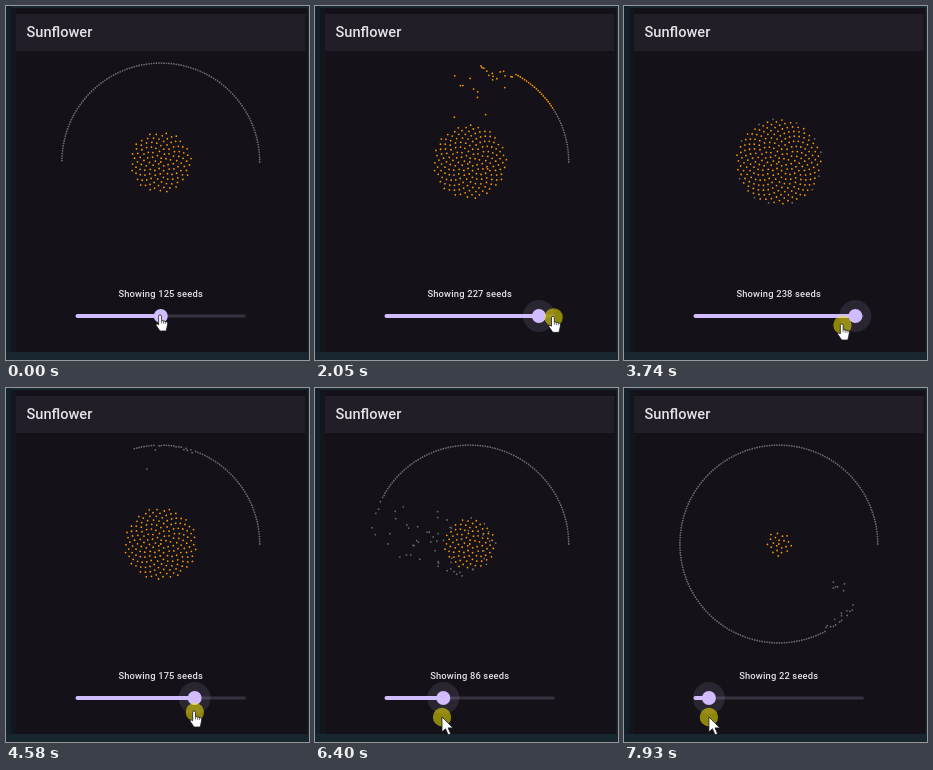
Recreate the animation shown at these times as an HTML page. Size 303 px wide and 354 px high, loop 8 s.

```html
<!DOCTYPE html>
<html lang="en">
<head>
<meta charset="utf-8">
<title>Sunflower</title>
<style>
  html, body { margin: 0; width: 100%; height: 100%; overflow: hidden; background: #18262f; }
  svg { display: block; width: 100%; height: 100%; }
  text { font-family: Roboto, Arial, sans-serif; font-weight: 500; fill: #e6e1e5; }
  .title { font-size: 14.6px; }
  .label { font-size: 9.35px; letter-spacing: .18px; text-anchor: middle; }
  .halo {
    fill: #d0bcff; fill-opacity: .11;
    transform-box: fill-box; transform-origin: center;
  }
  .pointer { fill: #fff; stroke: #1a1a1a; stroke-width: .8; stroke-linejoin: round; }
</style>
</head>
<body>
<svg viewBox="0 0 303 354">
  <rect width="303" height="354" fill="#18262f"/>
  <rect width="5" height="346" fill="#13202a"/>
  <rect x="5" y="2" width="296.5" height="344" fill="#141218"/>
  <rect x="5" y="2" width="5" height="344" fill="#10171d"/>
  <rect x="10" y="8" width="289.5" height="37" fill="#221e28"/>
  <text class="title" x="20.5" y="31">Sunflower</text>
  <g id="seeds"></g>
  <text class="label" id="label" x="154.7" y="290.5"></text>
  <rect x="70" y="308.4" width="170" height="3.2" rx="1.6" fill="#36323f"/>
  <rect id="active" x="69.5" y="308" height="4" rx="2" fill="#d0bcff"/>
  <circle class="halo" id="halo" cy="310" r="16"/>
  <circle id="thumb" cy="310" r="7" fill="#d0bcff"/>
  <g id="cursor">
    <circle id="press" r="9.2" fill="#fff000" fill-opacity=".52"/>
    <g class="pointer" id="hand" transform="translate(-.6 -.5)">
      <path d="M-1.5 .8a1.4 1.4 0 0 1 2.8 0V5l4.6 1q1.8.5 1.6 2.2L6.8 12l-.8 3.5H-.2L-4 9.8q-.5-1.2.8-1.5l1.7 1z"/>
      <path d="M1.3 5v3M3.4 5.6v2.6M5.3 6v2.4" fill="none" stroke-width=".6"/>
    </g>
    <path class="pointer" id="arrow" d="M0 0V15l3.5-3.2 2.6 6 2.6-1.1L6.1 10.9H11z"/>
  </g>
</svg>
<script>
const LOOP = 8000, TICK = 70, PHASE = 20, MAX = 250;
const CX = 154.8, CY = 156, RING = 98.9, SPREAD = RING / 36;
const TRACK = 70, UNIT = .678;
const TAU = Math.PI * 2, PHI = (Math.sqrt(5) + 1) / 2;
const $ = id => document.getElementById(id);

const rest = [154.75, 310];
const drags = [
  { t: 740, span: 460, to: [193, 310] },
  { t: 1752, span: 480, to: [260, 312] },
  { t: 3374, span: 660, to: [188.8, 324] },
  { t: 5040, span: 620, to: [167.6, 327] },
  { t: 5870, span: 510, to: [127, 329] },
  { t: 6885, span: 210, to: [100, 329] },
  { t: 7220, span: 200, to: [84.9, 329] }
];

const clamp = (v, lo, hi) => Math.max(lo, Math.min(hi, v));
const mix = (a, b, p) => a.map((v, k) => v + (b[k] - v) * p);

function progress(t, start, span) {
  const p = clamp((t - start) / span, 0, 1);
  return p * p * (3 - 2 * p);
}

function random(seed) {
  const r = Math.sin(seed * 12.9898 + 4.1) * 43758.5453;
  return r - Math.floor(r);
}

const pointerAt = t =>
  drags.reduce((at, d) => mix(at, d.to, progress(t, d.t, d.span)), rest);

// The slider follows the pointer in ticks, one tick behind.
function countAt(t) {
  const tick = Math.floor((t - PHASE) / TICK) * TICK + PHASE;
  const [x] = pointerAt(tick - TICK);
  return clamp(Math.round((x - TRACK) / UNIT), 0, MAX);
}

function home(i, lit) {
  const a = lit ? -i * TAU / PHI : i * TAU / (MAX - 1);
  const r = lit ? Math.sqrt(i) * SPREAD : RING;
  return [CX + r * Math.cos(a), CY + r * Math.sin(a)];
}

const place = (move, t) => mix(move.from, move.to, progress(t, move.t, move.span));

// Every seed keeps a list of moves, one for each time it is switched.
const seeds = Array.from({ length: MAX }, (_, i) => {
  const node = document.createElementNS("http://www.w3.org/2000/svg", "circle");
  node.setAttribute("r", .88);
  $("seeds").append(node);
  const lit = i < countAt(0), at = home(i, lit);
  return { node, moves: [{ t: 0, span: 1, from: at, to: at, lit }] };
});

for (let t = PHASE; t < LOOP; t += TICK) {
  const count = countAt(t);
  seeds.forEach(({ moves }, i) => {
    const last = moves[moves.length - 1], lit = i < count;
    if (lit === last.lit) return;
    const span = 250 + 500 * random(i + 1 + moves.length * 317);
    moves.push({ t, span, from: place(last, t), to: home(i, lit), lit });
  });
}

function draw(t) {
  for (const { node, moves } of seeds) {
    let n = moves.length - 1;
    while (n && moves[n].t > t) n--;
    const [x, y] = place(moves[n], t);
    node.setAttribute("cx", x.toFixed(2));
    node.setAttribute("cy", y.toFixed(2));
    node.setAttribute("fill", moves[n].lit ? "#ff9800" : "#6c6c6c");
  }

  const count = countAt(t), thumbX = TRACK + count * UNIT;
  $("label").textContent = `Showing ${count} seeds`;
  $("active").setAttribute("width", thumbX - 69.5);
  $("thumb").setAttribute("cx", thumbX);
  $("halo").setAttribute("cx", thumbX);
  $("halo").style.transform = `scale(${progress(t, 50, 150)})`;

  const [x, y] = pointerAt(t), overSlider = y < 325.5;
  $("cursor").setAttribute("transform", `translate(${x} ${y})`);
  $("press").style.display = t < 540 ? "none" : "";
  $("hand").style.display = overSlider ? "" : "none";
  $("arrow").style.display = overSlider ? "none" : "";
}

const begin = performance.now();
function frame() {
  draw((performance.now() - begin) % LOOP);
  requestAnimationFrame(frame);
}
draw(0);
requestAnimationFrame(frame);
</script>
</body>
</html>
```
